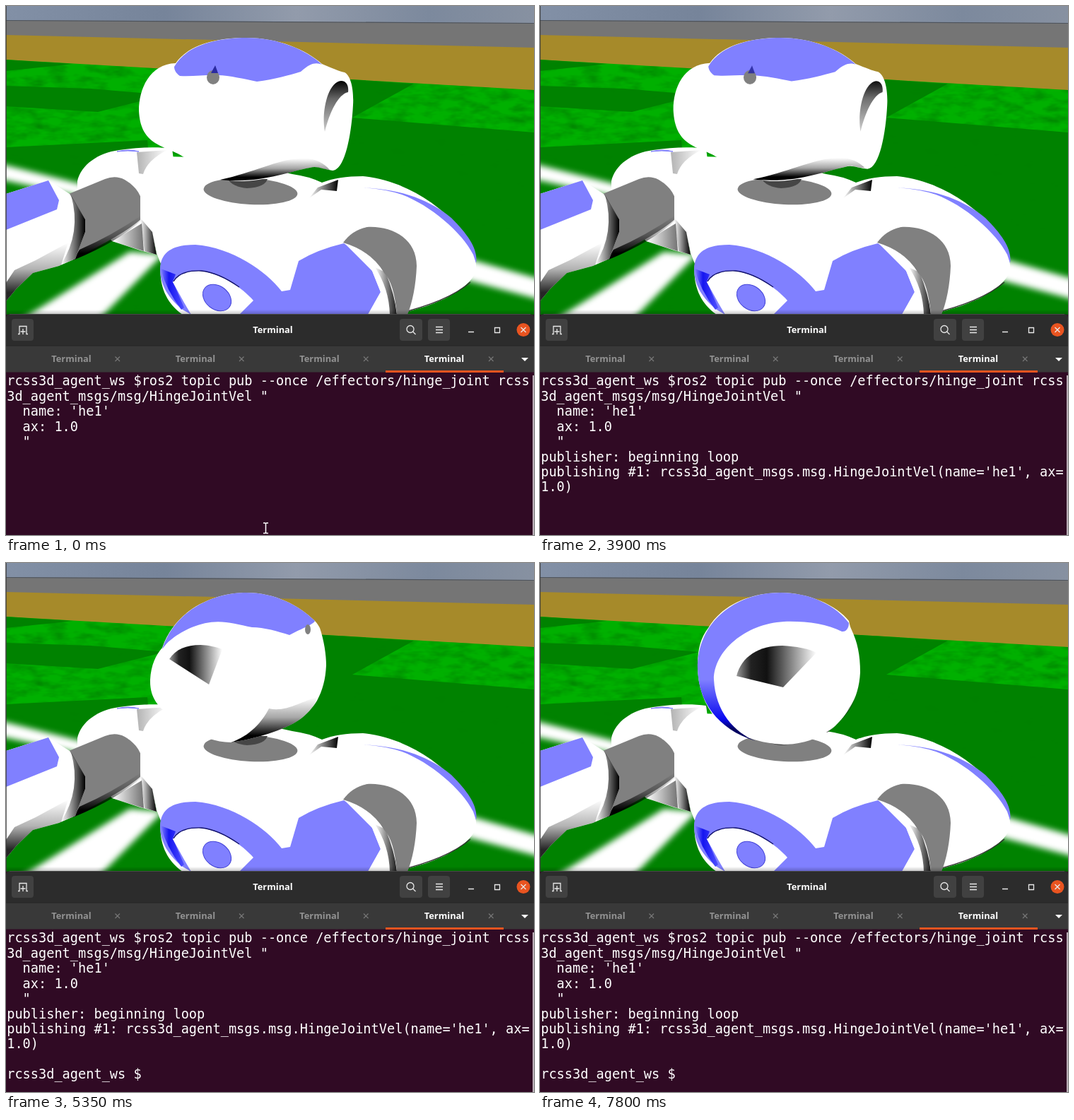
Write an HTML page that moves like this. It is 747 by 749 pixels and loops after 7.85 s.

```html
<!DOCTYPE html>
<html lang="en">
<head>
<meta charset="utf-8">
<title>Robot head joint</title>
<style>
html, body { margin: 0; width: 100%; height: 100%; overflow: hidden; background: #300a24; }
svg { position: absolute; left: 0; top: 0; width: 747px; height: 749px; }
#scenery { will-change: transform; }
.blue { fill: #8080ff; }
.gray { fill: #808080; }
.white { fill: #fff; }
.ui { font: bold 12.8px "Noto Sans", "Open Sans", sans-serif; text-anchor: middle; fill: #fff; }
.tab { fill: #929292; }
.mono { font: 18.62px "DejaVu Sans Mono", monospace; fill: #fff; white-space: pre; }
.icon { fill: none; stroke: #e8e8e8; stroke-width: 1.3; }
.cross { fill: none; stroke: #777; stroke-width: 1.2; }

#skull, #cap, #shade, #socket, #cone, #eye, #tip, #cursor, #blink, #pointer, #output, #prompt {
  animation: 7850ms linear infinite;
}
#skull { animation-name: skull; }
#cap { animation-name: cap; }
#shade { animation-name: shade; }
#socket { animation-name: socket; }
#cone { animation-name: cone; }
#eye { animation-name: eye; }
#tip { animation-name: tip; }
#cursor { animation-name: cursor; animation-timing-function: step-end; }
#blink { animation-name: blink; animation-timing-function: step-end; }
#pointer { animation-name: pointer; animation-timing-function: step-end; }
#output { animation-name: output; animation-timing-function: step-end; }
#prompt { animation-name: prompt; animation-timing-function: step-end; }

/* The head turns from 3870 to 5960 ms at a steady rate */
@keyframes skull {
  0%, 49.299% { d: path("M188 148C188 118 203 82 240 81C260 52 305 45 340 45C385 45 425 62 447 82C462 88 470 92 479 94C490 100 492 125 491 140C489 180 480 232 462 233C448 231 440 226 430 229C400 234 370 249 325 248C300 247 270 225 245 210C220 197 190 195 188 148Z"); }
  56.688% { d: path("M200 140C196 84 198 92 245 77C265 55 305 43 340 43C385 43 425 60 440 80C450 79 462 79 470 82C487 92 495 120 495 145C495 160 493 180 488 190C480 200 470 197 455 208C425 232 380 248 330 246C300 245 265 232 240 222C195 225 206 200 200 140Z"); }
  68.153% { d: path("M204 165C205 145 212 130 221 120C240 65 295 42 340 42C380 42 415 60 437 82C440 85 442 88 444 92C450 110 453 130 453 145C452 165 448 180 440 195C434 205 425 215 415 222C395 236 350 250 318 254C290 254 255 238 235 218C215 205 203 190 204 165Z"); }
  75.924%, 100% { d: path("M223 145C223 120 228 105 238 92C260 55 305 42 340 42C380 42 420 60 437 82C438 87 439 91 441 95C449 112 453 130 453 155C452 175 447 190 440 202C433 215 420 230 410 237C395 248 370 257 345 257C305 255 270 240 250 222C232 200 223 175 223 145Z"); }
}
@keyframes cap {
  0%, 49.299% { d: path("M238 86C255 55 300 45 340 45C385 45 425 62 447 83C440 80 432 79 417 93C400 98 380 104 355 107C340 104 315 98 300 98C285 97 265 100 246 99C240 95 238 90 238 86Z"); }
  56.688% { d: path("M242 78C265 53 305 43 340 43C385 43 425 60 442 80C440 88 437 96 427 99C410 97 385 96 370 96C350 98 325 103 303 104C285 100 265 92 254 86C250 82 246 80 242 78Z"); }
  68.153% { d: path("M221 122C240 65 295 42 340 42C380 42 415 60 437 82C435 87 420 92 401 102C385 97 365 91 348 91C330 87 315 83 300 83C275 83 250 95 235 107C228 112 224 118 221 122Z"); }
  75.924%, 100% { d: path("M223 150C222 85 275 42 340 42C385 42 420 62 437 85C437 92 433 98 427 97C405 86 375 82 345 83C290 86 246 125 246 165C248 210 275 240 305 252C250 235 224 195 223 150Z"); }
}
@keyframes shade {
  0%, 49.299% { d: path("M303 246C350 236 385 217 415 216C435 214 450 222 458 232C445 231 440 226 430 229C400 234 360 252 303 246Z"); }
  56.688% { d: path("M275 233C330 230 400 218 430 205C450 195 470 180 490 182C488 195 470 197 455 208C425 232 380 250 275 233Z"); }
  68.153% { d: path("M318 254C345 245 362 225 372 206C395 212 420 195 440 190C440 200 425 215 415 222C395 236 350 250 318 254Z"); }
  75.924%, 100% { d: path("M405 240C420 230 432 218 437 205C441 200 444 194 446 188C446 200 433 218 410 237C408 239 406 240 405 240Z"); }
}
@keyframes socket {
  0%, 49.299% { opacity: 1; d: path("M451 178C446 150 455 108 474 106C483 106 485 115 484 122C470 125 458 150 451 178Z"); }
  56%, 100% { opacity: 0; d: path("M493 175C494 150 494 130 493 110C493 110 494 115 494 120C494 135 494 160 493 175Z"); }
}
@keyframes cone {
  0%, 56.688% { opacity: 0; d: path("M199 150C199 130 200 118 200 115C201 114 202 118 203 122L202 170Z"); }
  58% { opacity: 1; }
  68.153% { opacity: 1; d: path("M231 136C240 122 255 116 275 116C285 116 297 119 306 122L287 172Z"); }
  75.924%, 100% { opacity: 1; d: path("M278 160C285 132 310 117 343 117C362 118 380 121 391 127L344 176Z"); }
}
@keyframes eye {
  0%, 49.299% { transform: translate(293px, 101px) scale(.9, 1); }
  56.688% { transform: translate(368px, 99px); }
  68.153% { transform: translate(427px, 94px) scale(.4, .7); }
  71%, 100% { transform: translate(436px, 92px) scale(0, .5); }
}
@keyframes tip {
  0%, 49.299% { opacity: 1; transform: none; }
  53%, 100% { opacity: 0; transform: translate(37px, 3px); }
}
@keyframes cursor {
  0% { transform: translate(34.8px, 606px); }
  11.465% { transform: translate(1.7px, 627.4px); }
  48.408% { transform: translate(1.7px, 691.8px); }
  50.955%, 100% { transform: translate(192px, 713.2px); }
}
@keyframes blink {
  0%, 19.108%, 34.395%, 49.682%, 64.968%, 80.255%, 95.541%, 100% { opacity: 0; }
  3.822%, 26.752%, 42.038%, 57.325%, 72.611%, 87.898% { opacity: 1; }
}
@keyframes pointer { 0% { opacity: 1; } 11.465%, 100% { opacity: 0; } }
@keyframes output { 0% { opacity: 0; } 48.408%, 100% { opacity: 1; } }
@keyframes prompt { 0% { opacity: 0; } 50.955%, 100% { opacity: 1; } }
</style>
</head>
<body>
<svg id="scenery" viewBox="0 0 747 749">
  <defs>
    <linearGradient id="sky">
      <stop offset="0" stop-color="#8290a6"/><stop offset=".3" stop-color="#76849a"/>
      <stop offset=".55" stop-color="#929bab"/><stop offset=".8" stop-color="#7c899d"/>
      <stop offset="1" stop-color="#8791a1"/>
    </linearGradient>
    <filter id="grass" x="0" y="0" width="1" height="1">
      <feTurbulence type="fractalNoise" baseFrequency=".035 .09" numOctaves="3" seed="4"/>
      <feColorMatrix values="0 0 0 0 0  0 0 0 0 .22  0 0 0 0 0  1.6 0 0 0 -.62"/>
    </filter>
    <filter id="soft"><feGaussianBlur stdDeviation="4"/></filter>
    <clipPath id="field"><path d="M0 76L747 119V437H0Z"/></clipPath>
  </defs>
  <rect width="747" height="30" fill="url(#sky)"/>
  <path d="M0 20L747 24V62H0Z" fill="#757575"/>
  <path d="M0 20.5L747 24.5" stroke="#4d535c" stroke-width="1.2"/>
  <path d="M0 41L747 59V121H0Z" fill="#a68a2a"/>
  <g clip-path="url(#field)">
    <rect y="70" width="747" height="367" fill="#00b000"/>
    <path d="M0 76L95 82L0 92ZM0 113L120 117L225 126L130 150L0 142ZM0 200L200 190L210 300L0 437ZM440 101L577 110L490 158L747 179V437H0V380L300 230Z" fill="#008200"/>
    <rect y="70" width="747" height="367" filter="url(#grass)"/>
    <g fill="#fff" filter="url(#soft)">
      <path d="M-10 223L130 258V275L-10 245Z"/>
      <path d="M20 445L175 348L222 352L130 445Z"/>
      <path d="M640 354L760 388V417L640 385Z"/>
    </g>
  </g>
</svg>

<svg viewBox="0 0 747 749">
  <defs>
    <linearGradient id="capTone" gradientUnits="userSpaceOnUse" x1="0" y1="165" x2="0" y2="235">
      <stop stop-color="#8080ff"/><stop offset=".8" stop-color="#0a0af0"/><stop offset="1" stop-color="#000060"/>
    </linearGradient>
    <linearGradient id="under" x2="0" y2="1">
      <stop stop-color="#000" stop-opacity="0"/><stop offset=".45" stop-color="#000" stop-opacity=".35"/>
      <stop offset=".85" stop-color="#000"/>
    </linearGradient>
    <linearGradient id="hollow" x2="0" y2="1">
      <stop stop-color="#000"/><stop offset=".35" stop-color="#666"/><stop offset="1" stop-color="#ccc"/>
    </linearGradient>
    <linearGradient id="fan">
      <stop stop-color="#999"/><stop offset=".18" stop-color="#222"/><stop offset=".38" stop-color="#111"/>
      <stop offset="1" stop-color="#fff"/>
    </linearGradient>
    <linearGradient id="fade"><stop stop-color="#000" stop-opacity="0"/><stop offset="1"/></linearGradient>
    <linearGradient id="fadeLeft"><stop/><stop offset="1" stop-color="#000" stop-opacity="0"/></linearGradient>
    <linearGradient id="side">
      <stop stop-color="#8080ff"/><stop offset=".35" stop-color="#1515f0"/><stop offset="1" stop-color="#5050ff"/>
    </linearGradient>
    <linearGradient id="top" x2="0" y2="1"><stop stop-color="#000" stop-opacity="0"/><stop offset="1" stop-opacity=".25"/></linearGradient>
  </defs>

  <!-- far shoulder and arm -->
  <path class="white" d="M101 248C106 225 130 208 160 204C185 200 215 199 235 202L240 240L207 315L213 352L190 346L150 333L101 270Z"/>
  <path d="M185 207L228 204Q200 218 194 238L188 237Z" fill="url(#fadeLeft)" opacity=".3"/>
  <path d="M150 333L192 308L195 347Z" fill="url(#fade)" opacity=".55"/>
  <path class="blue" d="M157 206Q174 202 188 206Q172 204 157 206Z" stroke="#8080ff"/>
  <path class="gray" d="M89 266L140 245Q155 239 168 246Q187 257 192 275V301Q165 325 95 358Q118 310 89 266Z"/>
  <path d="M95 360Q160 333 192 303V296Q150 325 104 345Z" fill="url(#under)"/>
  <path class="white" d="M0 266L60 247L90 266L112 302V320L98 358L75 368L38 378L15 400L0 418Z"/>
  <path d="M92 268L112 302V320L98 358L78 366Q107 320 92 268Z" fill="url(#fade)"/>
  <path d="M0 418L15 400L38 378L78 367L88 335L42 360L12 374L0 392Z" fill="url(#under)" opacity=".85"/>
  <path class="blue" d="M0 266L60 247L75 275L72 288L0 317Z"/>

  <!-- torso -->
  <path class="white" d="M190 262Q191 232 222 213L300 215L405 238Q428 241 447 250Q470 241 505 241C560 247 605 275 640 312C660 336 668 360 664 377C655 400 615 424 548 437H250C226 420 216 395 219 365L213 350L207 320L190 303Z"/>
  <path d="M190 300L207 320L213 352L196 347Z" fill="url(#fade)"/>
  <path d="M429 272L441 257L470 246L468 262L446 260Z" fill="url(#fade)"/>
  <ellipse class="gray" cx="346" cy="262.500" rx="66.500" ry="18.500" transform="rotate(3 346 262)"/>
  <path d="M314 245H370Q366 257 341 258Q320 256 314 245Z" fill="#464646"/>
  <path class="blue" d="M503 257C560 259 600 275 630 300C655 325 668 345 665 364L661 352C645 320 600 282 560 267Q535 259 503 257Z"/>
  <path d="M657 391Q625 419 552 436" fill="none" stroke="#333" stroke-width="1.500"/>
  <path class="blue" d="M250 430C225 410 218 390 218 372C219 348 236 338 268 338C320 342 368 375 390 404L402 402L414 361Q440 345 478 336L500 350L518 375L530 405L512 437H262Z"/>
  <path d="M219 372Q226 401 248 430L252 427L236 390L240 380Z" fill="url(#side)"/>
  <path class="white" d="M236 391Q245 375 274 375C305 378 334 399 350 417L330 437H262L252 420Z"/>
  <path d="M237 390Q246 374 276 375Q300 377 330 398" fill="none" stroke="#10106a" stroke-width="1.300"/>
  <ellipse class="blue" cx="298.500" cy="413" rx="22" ry="16.500" transform="rotate(38 298.500 413)" stroke="#4444d8"/>

  <!-- near arm -->
  <path class="white" d="M478 335Q515 345 537 377Q550 408 553 437H512L530 405L518 375Z"/>
  <path d="M522 370L537 377Q550 408 553 437H543Q542 400 522 370Z" fill="url(#fade)" opacity=".9"/>
  <path class="gray" d="M477 335Q490 317 511 313C547 311 581 330 581 368C580 395 575 420 568 437H553Q549 392 535 378Q517 347 477 335Z"/>

  <!-- head -->
  <path id="skull" class="white"/>
  <path id="shade" fill="url(#under)"/>
  <path id="socket" fill="url(#hollow)"/>
  <path id="cone" fill="url(#fan)"/>
  <path id="cap" fill="url(#capTone)"/>
  <circle id="eye" class="gray" r="10"/>
  <path id="tip" d="M290 95L296 84L300 95Z" fill="#2a2aa0"/>

  <!-- window -->
  <rect y="430" width="747" height="7" fill="url(#top)"/>
  <path d="M0 0V437" stroke="#333" stroke-width="1.500"/>
  <path d="M0 749V442Q0 436 6 436H741Q747 436 747 442V749Z" fill="#2c2c2c"/>
  <path d="M5 436.500H742" stroke="#484848"/>
  <rect y="481" width="747" height="38" fill="#393939"/>
  <path d="M0 481H747" stroke="#242424"/>
  <rect y="518.500" width="747" height="231" fill="#300a24"/>
  <rect x="537" y="516" width="167" height="3" fill="#e95420"/>
  <rect x="745" y="523" width="2" height="226" fill="#b9aeb6"/>

  <g fill="#414141">
    <rect x="8" y="443" width="31" height="31" rx="4"/>
    <rect x="557" y="443" width="32" height="31" rx="4"/>
    <rect x="597" y="443" width="31" height="31" rx="4"/>
  </g>
  <g class="icon">
    <path d="M17 464.500H19V453.500H29V464.500H31M24 457V465M20.500 461H27.500"/>
    <circle cx="572" cy="457.500" r="5"/><path d="M575.500 461L579.500 465"/>
    <path d="M608 454.500H618M608 458.500H618M608 462.500H618M654 461.500H662M691.500 455.500H698.500V462.500H691.500Z"/>
  </g>
  <circle cx="732" cy="458.500" r="9.500" fill="#e95420"/>
  <path class="icon" d="M728.500 455L735.500 462M735.500 455L728.500 462"/>
  <path class="cross" d="M154.500 496.500L161 503M161 496.500L154.500 503M330 496.500L336.500 503M336.500 496.500L330 503M506 496.500L512.500 503M512.500 496.500L506 503"/>
  <path class="cross" d="M683 496.500L689.500 503M689.500 496.500L683 503" stroke="#aaa"/>
  <path class="white" d="M729 498H739L734 503Z"/>
  <g class="ui">
    <text x="377.500" y="463">Terminal</text>
    <text class="tab" x="92.500" y="504">Terminal</text>
    <text class="tab" x="268" y="504">Terminal</text>
    <text class="tab" x="443.500" y="504">Terminal</text>
    <text x="620" y="504">Terminal</text>
  </g>

  <g class="mono">
    <text x="1.200" y="537.300">rcss3d_agent_ws $ros2 topic pub --once /effectors/hinge_joint rcss</text>
    <text x="1.200" y="558.700">3d_agent_msgs/msg/HingeJointVel "</text>
    <text x="23.600" y="580.200">name: 'he1'</text>
    <text x="23.600" y="601.600">ax: 1.0</text>
    <text x="23.600" y="623.100">"</text>
    <g id="output">
      <text x="1.200" y="644.500">publisher: beginning loop</text>
      <text x="1.200" y="665.900">publishing #1: rcss3d_agent_msgs.msg.HingeJointVel(name='he1', ax=</text>
      <text x="1.200" y="687.400">1.0)</text>
    </g>
    <text id="prompt" x="1.200" y="730.300">rcss3d_agent_ws $</text>
  </g>
  <g id="cursor"><rect id="blink" class="white" width="11.300" height="21.400"/></g>
  <path id="pointer" d="M364 732H366.500L367.500 733L368.500 732H371M367.500 733V745.500M364 746.500H366.500L367.500 745.500L368.500 746.500H371" fill="none" stroke="#fff" stroke-width="1.500"/>
</svg>
</body>
</html>
```
